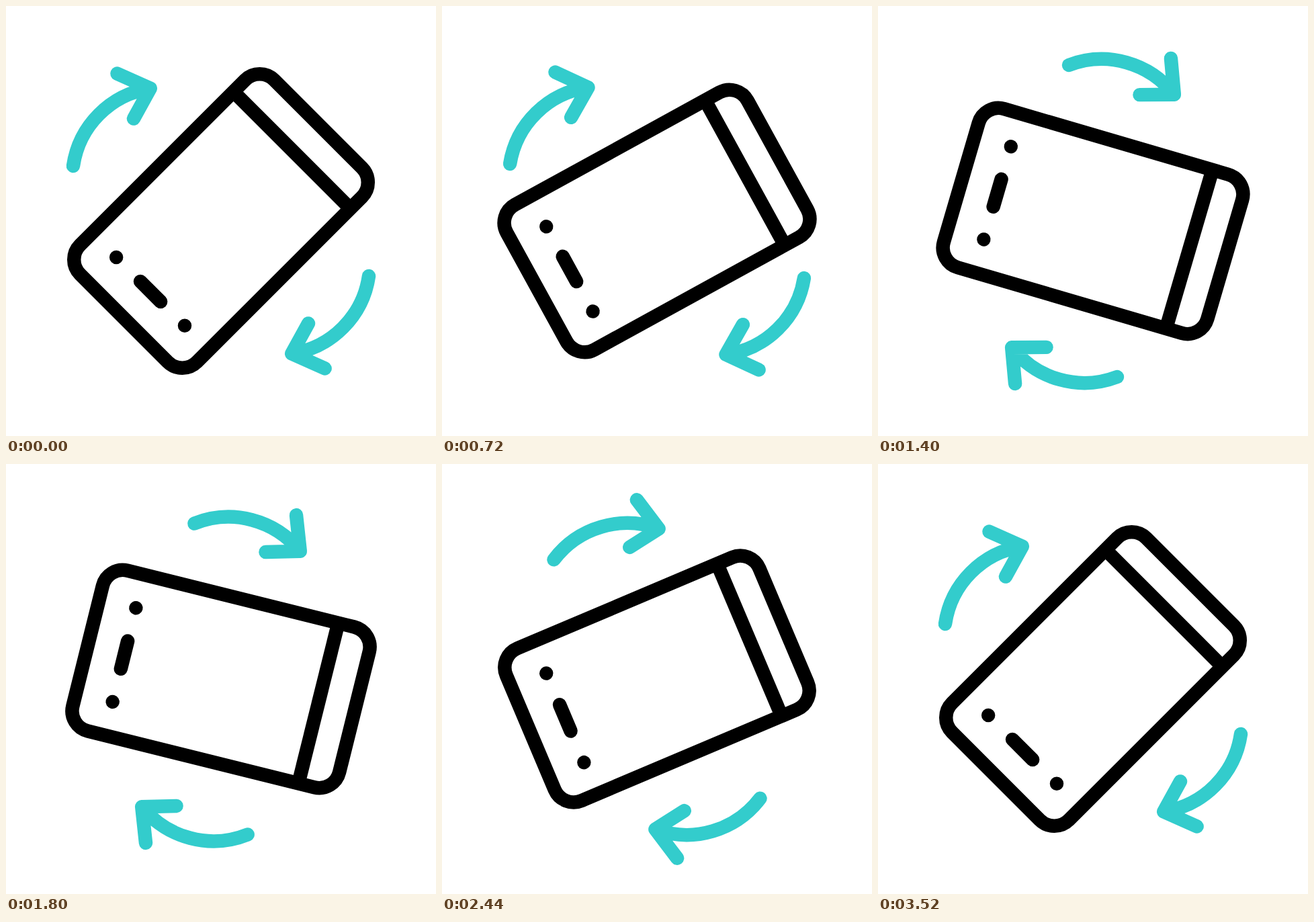
Recreate the animation shown at these times as an HTML page. Size 640 px wide and 640 px high, loop 3600 ms.

```html
<!DOCTYPE html>
<html lang="en">
<head>
<meta charset="utf-8">
<title>Rotate phone</title>
<style>
  html, body { margin: 0; width: 100%; height: 100%; overflow: hidden; background: #fff; }
  svg { display: block; width: 100%; height: 100%; }
</style>
</head>
<body>
<svg viewBox="-320 -320 640 640" fill="none" stroke-width="20.48" stroke-linecap="round" stroke-linejoin="round">
  <g id="phone" stroke="#000">
    <rect x="-204.4" y="-123" width="408.8" height="246" rx="30.72"/>
    <path d="M149.3-123V123" stroke-linecap="butt"/>
    <path d="M-148.4-21.3V21.3"/>
    <g fill="#000" stroke="none">
      <circle cx="-148.4" cy="-72" r="10.24"/>
      <circle cx="-148.4" cy="72" r="10.24"/>
    </g>
  </g>
  <g id="arrows" stroke="#33cccc">
    <path id="arrow" d="M-220-82A136.8 136.8 0 0 1-105.2-197.4M-154.6-219.4L-105.2-197.4L-130-152.4"/>
    <use href="#arrow" transform="rotate(180)"/>
  </g>
</svg>
<script>
const LOOP = 3600, STEP = 20, LAG = 67, REST = -45, SWING = 61.5;
const phone = document.getElementById("phone");
const arrows = document.getElementById("arrows");

const curve = (a, b, u) => 3 * a * u * (1 - u) ** 2 + 3 * b * u * u * (1 - u) + u ** 3;

function bezier(x1, y1, x2, y2) {
  return x => {
    if (x <= 0) return 0;
    if (x >= 1) return 1;
    let lo = 0, hi = 1;
    for (let i = 0; i < 30; i++) {
      const mid = (lo + hi) / 2;
      if (curve(x1, x2, mid) < x) lo = mid; else hi = mid;
    }
    return curve(y1, y2, lo);
  };
}

const windUp = bezier(0.525, -1.1, 0.146, 1); // pulls back before turning
const settle = bezier(0.7, 0, 0.3, 1);

const swing = t => SWING * (windUp((t - 190) / 1280) - settle((t - 1394) / 1920));

function turn(el, angle) {
  el.setAttribute("transform", `rotate(${angle})`);
}

function draw(t) {
  turn(phone, REST + swing(t));
  turn(arrows, swing(t - LAG));
}

const start = performance.now();
function tick() {
  const t = (performance.now() - start) % LOOP;
  draw(Math.floor(t / STEP) * STEP);
  requestAnimationFrame(tick);
}
tick();
</script>
</body>
</html>
```
